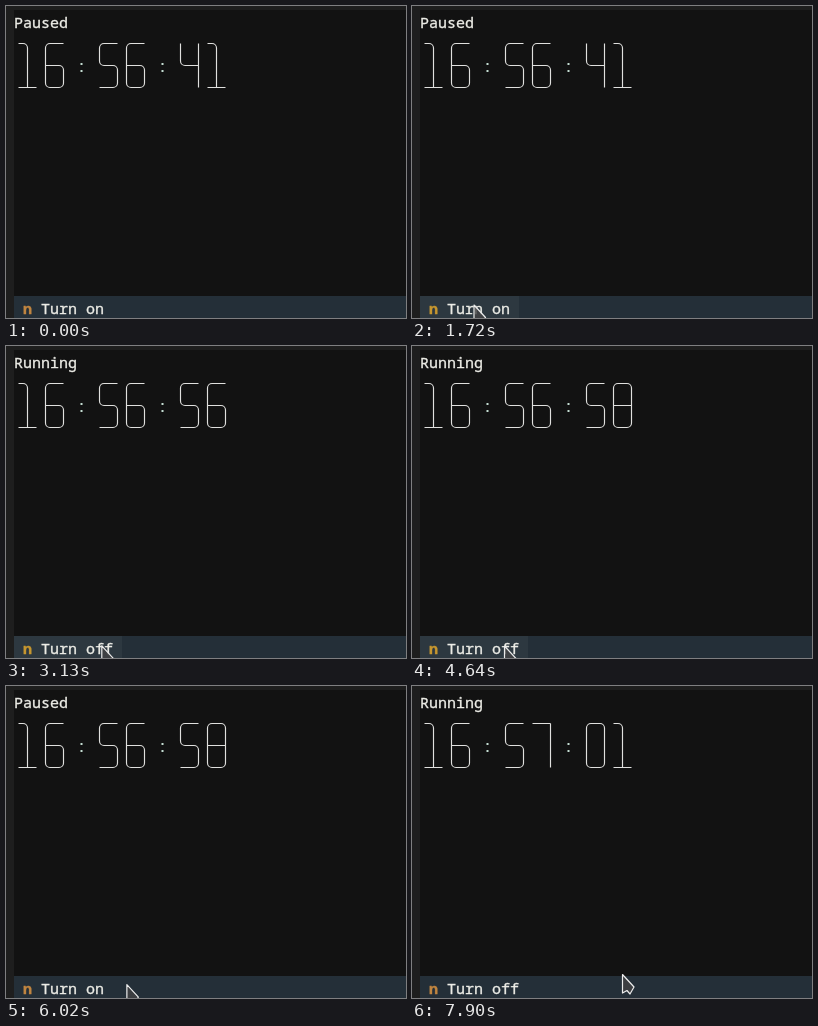
These frames come from a looping animation (400x312 px, 8000 ms). An HTML page with a canvas:

```html
<!DOCTYPE html>
<html lang="en">
<head>
<meta charset="utf-8">
<title>Terminal clock</title>
<style>
html, body { margin: 0; width: 100%; height: 100%; overflow: hidden; background: #1e1e1e; }
canvas { display: block; }
</style>
</head>
<body>
<canvas id="stage" width="400" height="312"></canvas>
<script>
const ctx = document.getElementById('stage').getContext('2d');
const LOOP = 8000;
const TICK = 960;
const CELL = 9, ROW = 22, LEFT = 8, TOP = 4;
const FOOTER = TOP + 13 * ROW;
const FONT = '15px "Noto Sans Mono", "DejaVu Sans Mono", monospace';

// Running spells; seconds are counted from 16:56:00 at the time "zero"
const paused = 41;
const spells = [
  { on: 1760, off: 4760, zero: 1760, seconds: 55 },
  { on: 6840, off: LOOP, zero: 6620, seconds: 60 }
];

// Pointer: where it enters, then each glide
const entry = { x: 342, y: 8 };
const glides = [
  { at: 290, ms: 160, x: 235, y: 150 },
  { at: 1030, ms: 440, x: 62, y: 299 },
  { at: 2040, ms: 120, x: 112, y: 314 },
  { at: 2410, ms: 160, x: 167, y: 296 },
  { at: 2730, ms: 440, x: 92.5, y: 300 },
  { at: 4960, ms: 160, x: 167, y: 296 },
  { at: 5860, ms: 320, x: 95, y: 300 },
  { at: 7740, ms: 160, x: 210.5, y: 288.5 }
];

// Box-drawing rows, three cells each
const digits = {
  0: ['╭─╮', '│ │', '╰─╯'],
  1: ['╶╮ ', ' │ ', '╶┴╴'],
  4: ['╷ ╷', '╰─┤', '  ╵'],
  5: ['╭─╴', '╰─╮', '╶─╯'],
  6: ['╭─╴', '├─╮', '╰─╯'],
  7: ['╶─┐', '  │', '  ╵'],
  8: ['╭─╮', '├─┤', '╰─╯']
};

// Arms leaving the centre of each cell
const arms = {
  '─': 'lr', '│': 'ud', '╶': 'r', '╴': 'l', '╷': 'd', '╵': 'u',
  '├': 'udr', '┤': 'udl', '┴': 'lru', '┐': 'ld',
  '╭': 'dr', '╮': 'dl', '╰': 'ur', '╯': 'ul'
};
const reach = { l: [-CELL / 2, 0], r: [CELL / 2, 0], u: [0, -ROW / 2], d: [0, ROW / 2] };

const ease = k => k * (1.55 - 0.55 * k);
const mix = (a, b, k) => a + (b - a) * k;

function drawCell(ch, cx, cy) {
  const ends = [...(arms[ch] || '')].map(a => [cx + reach[a][0], cy + reach[a][1]]);
  if ('╭╮╰╯'.includes(ch)) {
    const [v, h] = ends;
    ctx.moveTo(...v);
    ctx.arcTo(cx, cy, h[0], h[1], CELL / 2);
    ctx.lineTo(...h);
    return;
  }
  for (const end of ends) {
    ctx.moveTo(cx, cy);
    ctx.lineTo(...end);
  }
}

function drawClock(text) {
  ctx.strokeStyle = '#e0e0de';
  ctx.lineWidth = 1.15;
  [...text].forEach((ch, i) => {
    const x = LEFT + i * 3 * CELL;
    if (ch === ':') {
      rect(x + 12.5, 57, 2, 2, '#c4ddd2');
      rect(x + 12.5, 64, 2, 2, '#c4ddd2');
      return;
    }
    ctx.beginPath();
    digits[ch].forEach((row, r) => {
      [...row].forEach((c, k) => drawCell(c, x + (k + 0.5) * CELL, TOP + ROW * (r + 1) + 11.5));
    });
    ctx.stroke();
  });
}

function write(text, x, y, color, weight = '') {
  ctx.font = weight + ' ' + FONT;
  ctx.fillStyle = ctx.strokeStyle = color;
  ctx.lineWidth = 0.35;
  ctx.fillText(text, x, y);
  ctx.strokeText(text, x, y);
}

function rect(x, y, w, h, color) {
  ctx.fillStyle = color;
  ctx.fillRect(x, y, w, h);
}

function clockAt(t) {
  const spell = spells.filter(s => s.on <= t).pop();
  const seconds = spell
    ? spell.seconds + Math.floor((Math.min(t, spell.off) - spell.zero) / TICK)
    : paused;
  const minute = 56 + Math.floor(seconds / 60);
  return {
    text: `16:${minute}:${String(seconds % 60).padStart(2, '0')}`,
    running: Boolean(spell) && t < spell.off
  };
}

function pointerAt(t) {
  if (t < glides[0].at) return null;
  let { x, y } = entry;
  for (const g of glides) {
    if (t < g.at) break;
    const k = ease(Math.min(1, (t - g.at) / g.ms));
    x = mix(x, g.x, k);
    y = mix(y, g.y, k);
  }
  return { x, y };
}

function drawPointer({ x, y }) {
  ctx.save();
  ctx.translate(x, y);
  ctx.beginPath();
  ctx.moveTo(0, 0);
  ctx.lineTo(11.5, 12.5);
  ctx.lineTo(7.5, 19.5);
  ctx.lineTo(4.5, 16);
  ctx.lineTo(0, 18.5);
  ctx.closePath();
  ctx.fillStyle = 'rgba(66, 66, 68, 0.8)';
  ctx.fill();
  ctx.strokeStyle = '#ececec';
  ctx.lineWidth = 1.2;
  ctx.lineJoin = 'round';
  ctx.stroke();
  ctx.restore();
}

function drawRing(x, y) {
  ctx.beginPath();
  ctx.arc(x, y, 14, 0, Math.PI * 2);
  ctx.strokeStyle = 'rgba(255, 255, 255, 0.14)';
  ctx.lineWidth = 1;
  ctx.stroke();
}

function draw(t) {
  const { text, running } = clockAt(t);
  const label = running ? 'Turn off' : 'Turn on';
  const width = (label.length + 4) * CELL;
  const pointer = pointerAt(t);
  const hover = pointer && pointer.x < LEFT + width && pointer.y >= FOOTER;

  rect(0, 0, 400, 312, '#1e1e1e');
  rect(LEFT, TOP, 392, FOOTER - TOP, '#121212');
  rect(LEFT, FOOTER, 392, ROW, '#242f38');
  if (hover) rect(LEFT, FOOTER, width, ROW, '#2d3840');

  write(running ? 'Running' : 'Paused', LEFT, TOP + 18, '#ecece6');
  drawClock(text);
  write('n', LEFT + CELL, FOOTER + 18, hover ? '#c6962f' : '#c08540', 'bold');
  write(label, LEFT + 3 * CELL, FOOTER + 18, '#ecece6');

  if (t >= 660 && t < 780) drawRing(235, 151);
  if (pointer) drawPointer(pointer);
}

function frame(now) {
  draw(now % LOOP);
  requestAnimationFrame(frame);
}
draw(0);
requestAnimationFrame(frame);
</script>
</body>
</html>
```
